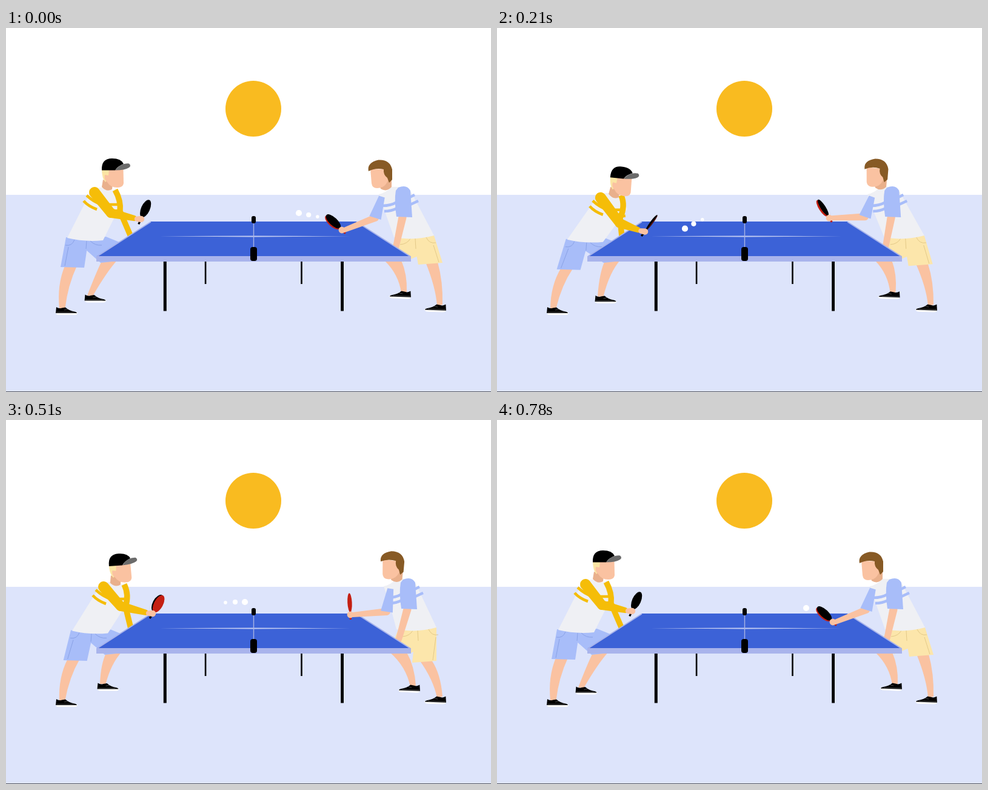
These frames come from a looping animation (800x600 px, 810 ms). An HTML page:

```html
<!DOCTYPE html>
<html lang="en">
<head>
<meta charset="utf-8">
<title>Table tennis</title>
<style>
  html, body { margin: 0; width: 100%; height: 100%; overflow: hidden; background: #fff; }
  svg { display: block; width: 100vw; height: 100vh; }
</style>
</head>
<body>
<svg viewBox="0 0 800 600">
  <rect width="800" height="600" fill="#fff"/>
  <rect y="275" width="800" height="325" fill="#dde4fb"/>
  <rect y="599" width="800" height="1" fill="#55565c"/>
  <circle cx="408" cy="133" r="46" fill="#f9bb20"/>
  <g id="back"></g>
  <g id="table">
    <path d="M259.8 385h5v81.6h-5zM552.2 385h4.8v81.6h-4.8zM327.8 385h2.6v37h-2.6zM486.2 385h2.6v37h-2.6z"/>
    <path d="M239 319H578L667 376H150Z" fill="#3c62d7"/>
    <path d="M239 319.5 151 376M578 319.5 666 376" stroke="#a9b4ec" stroke-width="1.6"/>
    <path d="M149 376H668V385H149Z" fill="#a9b4ec"/>
    <path d="M250 343.2 408 342.6 568 343.4 408 344.6Z" fill="#c4cdf2"/>
    <path d="M408.5 319V364" stroke="#aab4e4" stroke-width="1.4"/>
    <rect x="405" y="310" width="7" height="12" rx="3"/>
    <rect x="403" y="361" width="11" height="23" rx="4"/>
  </g>
  <g id="front"></g>
  <g id="ball" fill="#fff"></g>
</svg>
<script>
const LOOP = 810, STEP = 30;
const KEYS = [0, 150, 300, 420, 510, 630, 780];
const SKIN = '#fac2a1', SHADE = '#e9b08c', SHIRT = '#eff0f4', BLUE = '#a8bdf9',
      BLUE_LINE = '#869fe4', YELLOW = '#f5bd08', CREAM = '#fce6ab', CREAM_LINE = '#e0c684',
      RED = '#c41f12';

const left = {
  headX: [0, 27, 24.5, 19, 13.5, 8], headY: [0, 13, 12, 8, 5.6, 3.3], tilt: [0, 5, 6, -3, -4, -3],
  bodyX: [0, 25, 24, 18, 15, 8.5], bodyY: [0, 9, 8, 6, 4, 2],
  hip: [0, 15, 14, 12, 8, 6], knee: [171, 192, 188, 187, 178, 173],
  footX: [0, 29, 34, 34, 21, 0], footY: [0, 0, 4, 4, -6, 0],
  elbowX: [173, 203, 200, 192, 189, 182], elbowY: [305, 324, 315, 310, 307, 306],
  handX: [222, 242, 244, 245, 241, 234], handY: [316, 337, 335, 324, 320, 318],
  angle: [24, 37, 36, 29, 28, 25], black: [7.2, 2.4, 2.6, 6.4, 8.4, 2.8], red: [0, 0, 1.6, 5.4, 7.4, 1.2]
};

const right = {
  headX: [0, 4, 11, 17, 18, 11], headY: [0, -2, -1, -1, -1, -0.5], tilt: [0, 5, 4, 5, 5, 0],
  body: [0, -5, 0, 5, 8, 8], hip: [0, -2, 1, 4, 4, 3],
  hemX: [0, 0, -5, -9, -10, -8], hemY: [0, 1, 5, 9, 10, 7], knee: [0, -2, 3, 8, 9, 7],
  footX: [0, -5, 2, 12, 15, 12], footY: [0, 2, -2, 0, 3, 0],
  elbowX: [609, 603, 617, 623, 628, 626], elbowY: [313, 310, 314, 315, 316, 317],
  handX: [554, 545, 556, 562, 568, 569], handY: [333, 318, 309, 311, 321, 335],
  angle: [-47, -44, -8, 4, -3, -22], black: [6.6, 6.4, 0, 0, 0, 2.4], red: [6.6, 6.4, 2.4, 5, 3.7, 2.6]
};

// Ball flight: time, x, y, and the lift of the arc leading to the next point
const flight = [
  [0, 483, 305, 7.5], [150, 358, 308, 2], [225, 298, 338, 4], [300, 276, 322, 1],
  [362, 266, 314, 1], [420, 314, 307, 2], [510, 394, 300, 5.6], [630, 479, 335, 0],
  [655, 494, 343, 4], [755, 526, 314, 0], [780, 510, 310, 0], [LOOP, 483, 305, 0]
];

// Smooth curve through the key poses that never overshoots
function sample(track, t) {
  const v = [...track, track[0]], last = KEYS.length - 1;
  if (t >= KEYS[last]) return v[last];
  const slope = k => (v[k + 1] - v[k]) / (KEYS[k + 1] - KEYS[k]);
  const tangent = k => {
    if (k === 0 || k === last) return 0;
    const a = slope(k - 1), b = slope(k);
    return a * b > 0 ? 2 * a * b / (a + b) : 0;
  };
  let i = 0;
  while (t >= KEYS[i + 1]) i++;
  const h = KEYS[i + 1] - KEYS[i], u = (t - KEYS[i]) / h, w = 1 - u;
  return w * w * (1 + 2 * u) * v[i] + u * u * (3 - 2 * u) * v[i + 1]
       + h * u * w * (w * tangent(i) - u * tangent(i + 1));
}

function pose(tracks, t) {
  const p = {};
  for (const name in tracks) p[name] = sample(tracks[name], t);
  return p;
}

const shape = (d, fill) => `<path d="${d}" fill="${fill}"/>`;
const line = (d, color, width) =>
  `<path d="${d}" fill="none" stroke="${color}" stroke-width="${width}" stroke-linejoin="round"/>`;
const group = (transform, inner) => `<g transform="${transform}">${inner}</g>`;
const move = (x, y, inner) => group(`translate(${x} ${y})`, inner);
const dot = (x, y, r, fill) => `<circle cx="${x}" cy="${y}" r="${r}" fill="${fill}"/>`;
const shift = (x, y) => (px, py) => `${px + x} ${py + y} `;

function limb(ax, ay, bx, by, ra, rb, fill) {
  const d = Math.hypot(bx - ax, by - ay) || 1, nx = (ay - by) / d, ny = (bx - ax) / d;
  return shape(`M${ax + nx * ra} ${ay + ny * ra}L${bx + nx * rb} ${by + ny * rb}` +
    `A${rb} ${rb} 0 0 0 ${bx - nx * rb} ${by - ny * rb}L${ax - nx * ra} ${ay - ny * ra}` +
    `A${ra} ${ra} 0 0 0 ${ax + nx * ra} ${ay + ny * ra}Z`, fill);
}

const shoe =
  shape('M82 468Q82 473 88 473H114Q118 472 118 469Z', '#fff') +
  shape('M83 460Q87 463 92 461.5L98 460.5Q104 466 113 467.5Q117 468.5 117 470H82Z', '#000') +
  line('M83 468.6H112M96 465 102 463.6', '#777', 0.6);

function paddle(p, under, over) {
  const side = ([rx, dx, fill]) => rx > 0.2
    ? `<ellipse cx="${dx}" cy="-20" rx="${rx}" ry="15.5" fill="${fill}"/>` : '';
  return group(`translate(${p.handX} ${p.handY}) rotate(${p.angle})`,
    line('M0 -7V8', under[2], 3.2) + side(under) + side(over));
}

function leftBack(p) {
  const b = shift(p.bodyX, p.bodyY), h = shift(p.hip, p.hip * 0.18),
        m = shift(p.hip * 0.58, p.hip * 0.25), f = shift(p.footX, p.footY),
        calf = shift(p.hip * 0.3, 0), k = p.knee;
  const legs =
    shape(`M${k - 12} 382L${k + 13} 382Q${k - 5} 402 ${f(143.5, 441)}L${f(134, 441)}Q${k - 22} 402 ${k - 12} 382Z`, SKIN) +
    move(47.5 + p.footX, -20.5 + p.footY, shoe) +
    shape(`M${m(97, 392)}L${m(117, 392)}Q${calf(102, 424)}97.5 462L88 462Q${calf(84, 424)}${m(97, 392)}Z`, SKIN) + shoe;
  const shorts =
    shape(`M${h(128, 348)}L${h(165, 344)}L${h(187, 353)}L${k + 14} 384L${k - 15} 387L${h(130, 364)}Z`, BLUE) +
    shape(`M${h(99, 345)}L${h(136, 348)}L${m(129, 395)}L${m(90, 394)}Z`, BLUE) +
    line(`M${h(133, 351)}L${h(132, 364)}M${h(98, 358)}Q${h(109, 360)}${h(113, 349)}M${h(139, 351)}Q${h(147, 359)}${h(158, 358)}M${m(97, 392)}L${h(103, 361)}`, BLUE_LINE, 0.9);
  const shirt =
    shape(`M${b(138, 273)}Q${b(148, 262)}${b(158, 263)}Q${b(168, 271)}${b(182, 265)}L${b(190, 290)}L${h(160, 350)}Q${h(130, 353)}${h(101, 346)}Z`, SHIRT) +
    line(`M${b(128, 285)}Q${b(136, 294)}${b(150, 299)}M${b(133, 276)}Q${b(145, 287)}${b(158, 291)}M${b(160, 291)}L${b(184, 291)}M${b(170, 302)}L${b(187, 301)}`, YELLOW, 4.6);
  const arm = line(`M${b(180, 267)}Q${190 + p.bodyX * 0.9} ${285 + p.bodyY} ` +
    `${188 + p.bodyX * 0.6} ${302 + p.bodyY * 1.3}L206 344`, YELLOW, 9.5);
  const head = group(`translate(${p.headX} ${p.headY}) rotate(${p.tilt} 170 258)`,
    shape('M160 250 176 256 175 266Q166 271 158 262Z', SHADE) +
    shape('M158 232H174L171 246 164 254Q158 248 158 232Z', '#fbe5a4') +
    shape('M170 233H193.5L194 256Q193 263 184 263Q172 263 167 254Q161 250 163 242L169 243Z', SKIN) +
    shape('M158 234.5Q157 215 175 215Q190 215 194 224Q184 228 180 234.5Z', '#000') +
    shape('M180 234.5Q190 222 203 223.5Q207 227 203 230Q196 234.5 180 234.5Z', '#6b6b6b'));
  return legs + shorts + shirt + arm + head;
}

function leftFront(p) {
  const dx = p.handX - p.elbowX, dy = p.handY - p.elbowY, d = Math.hypot(dx, dy);
  const wx = p.handX - dx / d * 11, wy = p.handY - dy / d * 11;
  return paddle(p, [p.black, 0, '#000'], [p.red, 1.4, RED]) +
    limb(146 + p.bodyX, 271 + p.bodyY, p.elbowX, p.elbowY, 9, 8, YELLOW) +
    limb(p.elbowX, p.elbowY, wx, wy, 8, 4.6, YELLOW) +
    limb(wx + dx / d * 5, wy + dy / d * 5, p.handX + 1, p.handY - 1, 4.3, 5.2, SKIN);
}

function rightBack(p) {
  const b = shift(p.body, 0), h = shift(p.hip, 0), m = shift(p.hemX, p.hemY),
        f = shift(p.footX, p.footY), calf = shift(p.hemX * 0.4, 0),
        shin = shift((p.knee + p.footX) / 2, 0), k = p.knee;
  const kick = group('translate(808 -5) scale(-1 1) rotate(-2 100 470)', shoe);
  const legs =
    shape(`M${624 + k} 383L${652 + k} 383Q${shin(662, 406)}${f(661, 435)}L${f(652, 437)}Q${shin(648, 406)}${624 + k} 383Z`, SKIN) +
    move(p.footX - 58, p.footY - 22, kick) +
    shape(`M${m(692, 386)}L${m(712, 386)}Q${calf(721, 418)}720 456L711 458Q${calf(709, 428)}${m(692, 386)}Z`, SKIN) + kick;
  const shorts =
    shape(`M${h(644, 343)}L${h(680, 345)}L${h(682, 375)}L${655 + k} 386L${h(635, 365)}Z`, CREAM) +
    shape(`M${h(672, 345)}L${h(706, 342)}L${m(720, 387)}L${m(680, 390)}Z`, CREAM) +
    line(`M${h(675, 347)}L${h(676, 364)}M${h(693, 345)}Q${h(698, 356)}${h(709, 354)}M${h(667, 347)}Q${h(662, 356)}${h(650, 357)}M${m(714, 386)}L${h(705, 358)}`, CREAM_LINE, 0.9);
  const shirt =
    shape(`M${b(615, 274)}Q${b(626, 272)}${b(636, 262)}Q${b(654, 260)}${b(668, 270)}L${h(706, 342)}Q${h(674, 351)}${h(640, 345)}L${b(624, 300)}Z`, SHIRT) +
    line(`M${b(621, 293)}Q${b(634, 293)}${b(645, 287)}M${b(624, 302)}Q${b(636, 302)}${b(645, 297)}M${b(666, 279)}L${b(674, 275)}M${b(667, 291)}L${b(680, 285)}`, BLUE, 4.4);
  const arm =
    limb(654 + p.body, 312, 643 + p.body * 0.6, 362, 6.6, 5, SKIN) +
    shape(`M${b(647, 263)}Q${b(661, 257)}${b(667, 268)}L${b(670, 312)}L${b(644, 311)}Q${b(640, 285)}${b(643, 268)}Z`, BLUE);
  const head = group(`translate(${p.headX} ${p.headY}) rotate(${p.tilt} 620 258)`,
    shape('M616 258 636 246V262Q628 271 618 265Z', SHADE) +
    shape('M601 232 627 233 632 248 627 257Q622 264 612 264Q604 264 603 256Z', SKIN) +
    shape('M598 236Q595 222 614 217.5Q633 216 637 233V250L632 255 629 247Q622 242 623 233Q610 230 598 236Z', '#875a25'));
  return legs + shorts + shirt + arm + head;
}

function rightFront(p) {
  const ex = p.elbowX, ey = p.elbowY, tx = 620 + (ex - 609) * 0.75, ty = 278;
  const d = Math.hypot(ex - tx, ey - ty), nx = (ey - ty) / d, ny = (tx - ex) / d;
  const at = (x, y, r) => `${x + nx * r} ${y + ny * r} `;
  return paddle(p, [p.red, p.black > 0.2 ? -1.4 : 0, RED], [p.black, 0.8, '#000']) +
    limb(ex, ey, p.handX + 4, p.handY, 6, 4, SKIN) +
    dot(p.handX, p.handY, 5.4, SKIN) +
    shape(`M${at(tx, ty, -5)}L${at(tx, ty, 5)}L${at(ex, ey, 10)}L${at(ex, ey, -10)}Z`, BLUE);
}

function ballAt(time) {
  const t = (time + LOOP) % LOOP;
  let i = 0;
  while (t >= flight[i + 1][0]) i++;
  const [t0, x0, y0, lift] = flight[i], [t1, x1, y1] = flight[i + 1], u = (t - t0) / (t1 - t0);
  return [x0 + (x1 - x0) * u, y0 + (y1 - y0) * u - lift * 4 * u * (1 - u)];
}

// A fast ball is stretched along its path and leaves two smaller echoes
function ball(t) {
  const fast = t < 240 || (t > 395 && t < 680);
  const sizes = fast ? [5.1, 4.1, 2.8] : [5];
  return sizes.map((r, i) => {
    const [x, y] = ballAt(t - i * 18);
    return dot(x, y, r, '#fff');
  }).join('');
}

const layer = id => document.getElementById(id);
const back = layer('back'), front = layer('front'), ballLayer = layer('ball');
let shown = -1;

function draw(now) {
  const t = Math.floor((now % LOOP) / STEP) * STEP;
  if (t === shown) return;
  shown = t;
  const l = pose(left, t), r = pose(right, t);
  back.innerHTML = leftBack(l) + rightBack(r);
  front.innerHTML = leftFront(l) + rightFront(r);
  ballLayer.innerHTML = ball(t);
}

let start = null;
function tick(now) {
  if (start === null) start = now;
  draw(Math.max(0, now - start));
  requestAnimationFrame(tick);
}
draw(0);
requestAnimationFrame(tick);
</script>
</body>
</html>
```
